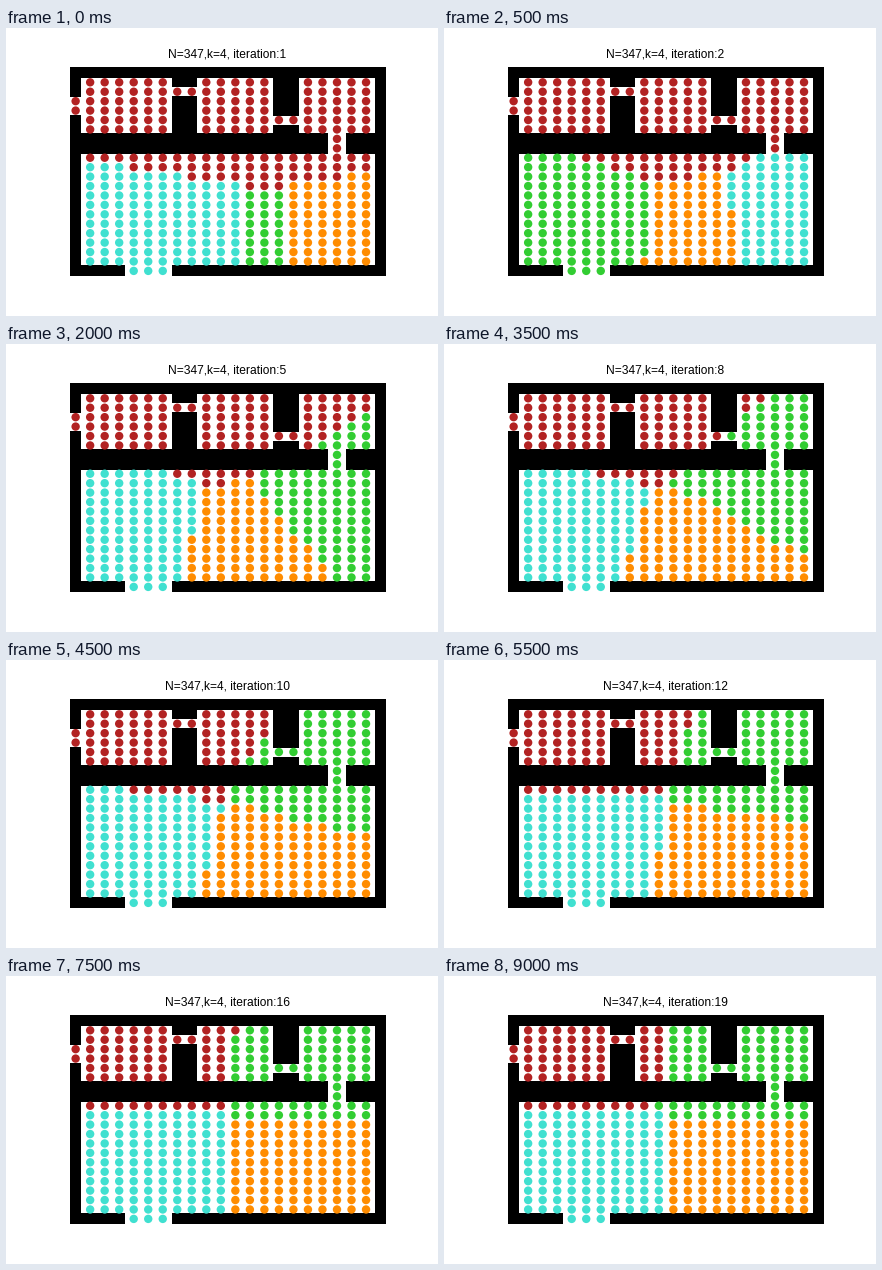
Recreate the animation shown at these times as a matplotlib script. Size 432 px wide and 288 px high, loop 9500 ms.

```python
import matplotlib.pyplot as plt
import numpy as np
from matplotlib.animation import FuncAnimation
from matplotlib.patches import Rectangle

W, H, DPI = 432, 288, 72
STEPS = 19
COLORS = np.array(["firebrick", "limegreen", "turquoise", "darkorange"])
# Screen position of grid point (0, 0) and the grid pitch
X0, Y0, DX, DY = 84.15, 54.3, 14.52, 9.43
DOT = 8.4


def block(x0, x1, y0, y1):
    """Grid points of a rectangle, both ends included."""
    return [(x, y) for y in range(y0, y1 + 1) for x in range(x0, x1 + 1)]


points = np.array(
    block(0, 5, 0, 5) + block(-1, -1, 2, 3)          # left room, west door
    + block(6, 7, 1, 1) + block(8, 12, 0, 5)         # passage, middle room
    + block(13, 14, 4, 4) + block(15, 19, 0, 5)      # passage, right room
    + block(17, 17, 6, 7) + block(0, 19, 8, 19)      # passage, hall
    + block(3, 5, 20, 20),                           # south door
    dtype=float,
)

# Open floor as left, top, right, bottom
FLOORS = [
    (75, 50, 166, 105), (64, 69, 75, 87), (166, 59, 191, 68),
    (191, 50, 267, 105), (267, 88, 293, 97), (293, 50, 369, 105),
    (322, 105, 340, 126), (75, 126, 369, 237), (119, 237, 166, 248),
]


def kmeans(centers, steps):
    """Labels of every step; centers are kept sorted from top to bottom."""
    history = []
    for _ in range(steps):
        dist = ((points[:, None] - centers) ** 2).sum(axis=2)
        labels = dist.argmin(axis=1)
        history.append(labels)
        centers = np.array([points[labels == k].mean(axis=0)
                            for k in range(len(centers))])
        centers = centers[centers[:, 1].argsort()]
    return history


start = np.array([(12, 5), (12, 17), (9, 17), (15, 17)], dtype=float)
history = kmeans(start, STEPS)

fig = plt.figure(figsize=(W / DPI, H / DPI), dpi=DPI, facecolor="white")
ax = fig.add_axes([0, 0, 1, 1])
ax.set_xlim(0, W)
ax.set_ylim(H, 0)
ax.axis("off")


def rect(x0, y0, x1, y1, color):
    ax.add_patch(Rectangle((x0, y0), x1 - x0, y1 - y0, facecolor=color,
                           linewidth=0, antialiased=False))


rect(64, 39, 380, 248, "black")
for floor in FLOORS:
    rect(*floor, "white")

dots = ax.scatter(X0 + DX * points[:, 0], Y0 + DY * points[:, 1],
                  s=DOT ** 2, linewidths=0, zorder=3)
title = ax.text(221.4, 29.6, "", ha="center", va="baseline",
                family="Liberation Sans", fontsize=12, color="black")


def update(i):
    dots.set_facecolor(COLORS[history[i]])
    title.set_text(f"N={len(points)},k={len(start)}, iteration:{i + 1}")
    return dots, title


anim = FuncAnimation(fig, update, frames=STEPS, interval=500,
                     repeat=True, repeat_delay=0)
plt.show()
```
